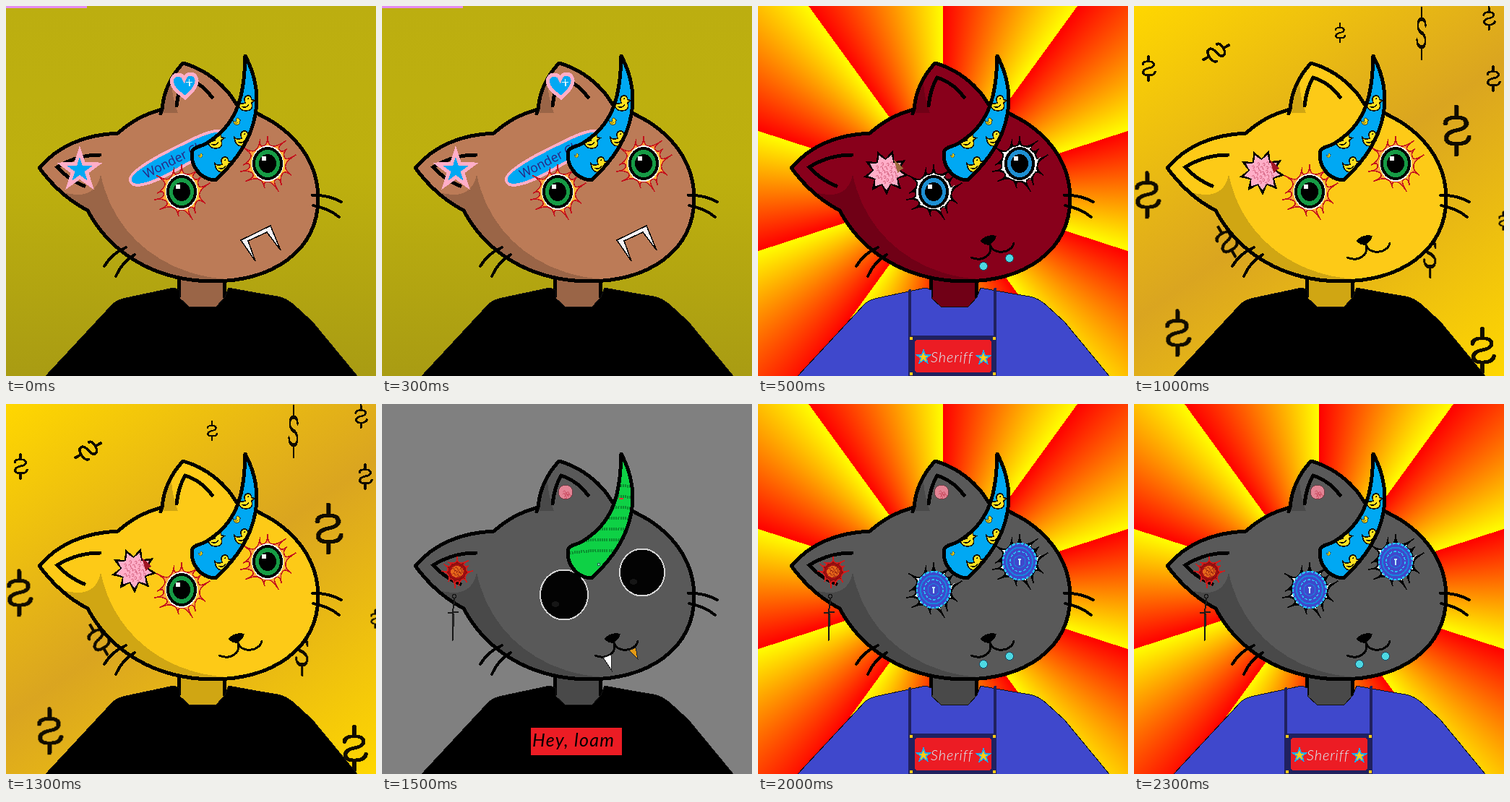
An HTML page that plays this animation: 512x512 px, repeating every 2.5 s.

```html
<!DOCTYPE html>
<html lang="en">
<head>
<meta charset="utf-8">
<title>Horned cat</title>
<style>
  html, body { margin: 0; width: 100%; height: 100%; overflow: hidden; }
  svg { display: block; width: 512px; height: 512px; shape-rendering: crispEdges; }
</style>
</head>
<body>
<svg id="stage" viewBox="0 0 512 512"></svg>
<script>
const stage = document.getElementById('stage');
const BLUE = '#00a8f3', PINK = '#ffaec8', RED = '#ec1c24', GOLD = '#ffca18', ROYAL = '#3f48cc', NAVY = '#20215f';

const path = (d, fill = 'none', stroke = 'none', width = 1, extra = '') =>
  `<path d="${d}" fill="${fill}" stroke="${stroke}" stroke-width="${width}" stroke-linecap="round" ${extra}/>`;
const line = (d, width, color = '#000') => path(d, 'none', color, width);
const oval = (x, y, rx, ry, fill, stroke = 'none', width = 1, extra = '') =>
  `<ellipse cx="${x}" cy="${y}" rx="${rx}" ry="${ry}" fill="${fill}" stroke="${stroke}" stroke-width="${width}" ${extra}/>`;
const rect = (x, y, w, h, fill, extra = '') =>
  `<rect x="${x}" y="${y}" width="${w}" height="${h}" fill="${fill}" ${extra}/>`;
const at = (x, y, art, more = '') => `<g transform="translate(${x} ${y}) ${more}">${art}</g>`;
const range = (n, make) => Array.from({ length: n }, (_, i) => make(i));
const polar = (r, a) => `${(r * Math.sin(a)).toFixed(1)} ${(-r * Math.cos(a)).toFixed(1)}`;

const starPath = (n, outer, inner) =>
  `M${range(2 * n, i => polar(i % 2 ? inner : outer, i * Math.PI / n)).join('L')}Z`;

// Ring of thin, slightly hooked spikes of uneven length.
function burstPath(n, inner, outer) {
  const step = 2 * Math.PI / n;
  return `M${polar(inner, -step / 2)}` + range(n, i => {
    const a = i * step, root = polar(inner, a);
    const tip = polar(outer * (.9 + .1 * Math.sin(i * 2.4)), a + step * .4 * Math.sin(i * 1.7));
    return `Q${root} ${tip}Q${root} ${polar(inner, a + step / 2)}`;
  }).join('') + 'Z';
}

// Short wiggles scattered inside a disc.
const squiggles = (r, n, color) =>
  line(range(n, i => `M${polar(r * Math.sqrt(i / n), i * 2.4)}q2-3 3 0t${2 - i % 5} 2`).join(''), .8, color);

// Backgrounds
const sunburst = 'repeating-conic-gradient(red 0deg, #ff0 36deg)';
const mustard = 'linear-gradient(#bcae10, #beb00e 45%, #a99c13)';
const gold = 'linear-gradient(145deg, #ffd700, #daa520 50%, #ffd700)';

const dollarSign = line('M-12-9Q-12-17 0-17 12-17 11-8 10-2 0 0-11 3-11 10-11 18 0 18 13 18 14 9M0-31V-17M0 18V32', 5, '#110c00');
const dollar = (x, y, size, turn = 0, slim = 1) =>
  at(x, y, dollarSign, `rotate(${turn}) scale(${size * 1.2 * slim} ${size})`);
const money = '<g filter="url(#soft)">' +
  dollar(20, 86, .55) + dollar(114, 64, .65, 60) + dollar(285, 37, .42) + dollar(398, 37, 1.1, 0, -.35) +
  dollar(491, 17, .5) + dollar(497, 100, .55) + dollar(446, 172, 1.05) + dollar(18, 261, .97) +
  dollar(128, 326, .75, -30) + dollar(410, 343, 1, 0, -.5) + dollar(511, 297, .4) +
  dollar(60, 452, .97) + dollar(482, 476, .95) + '</g>';

// Body
const headPath = 'M46 224C72 194 108 178 155 176C172 160 190 150 216 143C218 118 229 96 245 79' +
  'C277 88 304 110 319 136C333 139 343 145 350 150C402 175 432 217 432 267C431 340 368 381 285 381' +
  'C207 380 145 343 113 283C86 269 63 247 46 224Z';
const shadePath = 'M131 233C147 312 212 372 306 378L285 381C207 380 145 343 113 283L80 258Q124 270 131 233Z' +
  'M216 148Q218 125 229 106Q230 128 238 148Z';
const innerEars = 'M130 206Q98 206 71 223Q86 240 108 249M236 138Q239 113 248 99Q270 106 285 126';
const whiskers = 'M424 262Q445 261 464 271M425 276Q446 280 461 292M166 334Q147 342 136 360M178 344Q160 355 152 374';
const neckPath = 'M240 375V404L252 417H292L303 403V375Z';
const shadow = d => path(d, '#000', 'none', 1, 'opacity=".18"');

const cat = skin => path(neckPath, skin) + shadow(neckPath) + line('M239 378V403M302 380V402', 5) +
  path(headPath, skin) + shadow(shadePath) + path(headPath, 'none', '#000', 5, 'stroke-linejoin="round"') +
  line('M216 143L214 149' + innerEars, 5) + line(whiskers, 4);

const shirt = color => path('M55 512L148 412Q155 406 166 404L232 390 240 393V404L253 416H291L303 403 308 390 ' +
  'Q345 397 376 402 388 404 400 415L424 437 486 512Z', color, '#111');

const script = (x, y, size, color, words, more) =>
  `<text x="${x}" y="${y}" fill="${color}" font-family="Lato, sans-serif" font-style="italic" font-size="${size}" ${more}>${words}</text>`;

const badgeStar = path(starPath(5, 10, 4), GOLD, '#1fa8e8', 1.5);
const sheriff = shirt(ROYAL) + line('M210 394V460M328 392V460', 4, NAVY) +
  rect(208, 456, 122, 56, NAVY) + rect(217, 462, 106, 45, RED, 'rx="4"') +
  [212, 327].map(x => oval(x, 460, 2.5, 2.5, GOLD) + oval(x, 509, 2.5, 2.5, GOLD)).join('') +
  at(229, 486, badgeStar) + at(312, 487, badgeStar) +
  script(239, 493, 20, '#d8f8ff', 'Sheriff', 'font-weight="300" letter-spacing=".9"');
const blackShirt = shirt('#000');
const slogan = blackShirt + rect(206, 448, 126, 38, RED) +
  script(208, 474, 25, '#000', 'Hey, loam', 'letter-spacing="1.3"');

// Eyes
const eyes = art => at(243, 257, art) + at(362, 218, art);
const iris = color => oval(0, 0, 19, 21, color, '#000', 4) + oval(0, 0, 12, 13, '#000') + oval(-5, -7, 3.5, 3.5, '#fff');
const lashes = burstPath(13, 25, 42);
const whiteFringe = path(burstPath(13, 24, 31), '#fff');
const flameEye = path(lashes, 'url(#flame)', '#c3101b', 1.5) + oval(0, 0, 22, 25, '#fff') + iris('#169b45');
const blueEye = path(lashes, '#000', '#000', 1.5) + whiteFringe + iris('#1e8fd2');
const mandalaEye = path(lashes, '#000', '#000', 1.5) + whiteFringe + oval(0, 0, 24, 26, ROYAL) +
  range(4, i => oval(0, 0, 23 - 5 * i, 25 - 5.5 * i, 'none', i % 2 ? '#1784dd' : '#25c4f5', 2.5 - i / 2,
    `stroke-dasharray="${i % 2 ? '' : '4 2'}"`)).join('') + line('M0-3V5M-2-3H2', 1.2, '#bdefff');
const darkEye = (x, y, r) => oval(x, y, r, r + 1.5, '#030303', '#d5d5d5', 2) + oval(x - 12, y + 13, 5, 4, '#161616');
const darkEyes = darkEye(252, 264, 33) + darkEye(360, 233, 31);

// Mouths
const smile = path('M308 325Q315 315 330 318 328 327 319 331 311 330 308 325Z', '#000') +
  line('M295 348Q309 354 319 344 323 339 321 330Q326 344 344 339 353 335 354 328', 3);
const stud = (x, y) => oval(x, y, 5.5, 5.5, '#4ed8e2', '#14506a');
const studs = stud(312, 360) + stud(348, 349);
const fangs = path('M306 351L317 347 318 369Z', '#fff', '#222') + path('M342 341L351 337 354 353Z', '#e39a16', '#222');
const longFangs = path('M325 324L366 304 380 338 361 313 335 325 345 353Z', '#f6f3f6', '#000', 1.5);

// Horns
const hornPath = 'M331 69C357 118 356 180 290 241C268 240 254 220 258 200C262 193 270 197 285 185C320 160 330 125 331 69Z';
const horn = (color, pattern) => path(hornPath, color) + `<g clip-path="url(#horn)">${pattern}</g>` +
  path(hornPath, 'none', '#000', 5, 'stroke-linejoin="round"');
const duckArt = path('M-9-2Q-5 2 0-1-3-9 3-10 8-10 8-5L12-4 8-1Q11 8 2 9-8 10-9-2Z', '#ffe11f', '#15130a', 1.5) +
  line('M-4 4Q1 6 4 2', 1.4) + oval(4, -6, 1, 1, '#000');
const duck = (x, y, size) => at(x, y, duckArt, `scale(${size})`);
const duckHorn = horn(BLUE, duck(331, 135, 1.1) + duck(326, 184, 1.1) + duck(289, 187, 1.1) +
  duck(299, 220, 1.1) + duck(319, 160, .5) + duck(269, 207, .3));
const greenHorn = horn('#0ed145', range(7, i =>
  path(`M250 ${118 + i * 15}q50-9 105-3`, 'none', '#0a8f30', 4, 'stroke-dasharray="2 1.2" style="stroke-linecap:butt"')).join('') +
  oval(331, 131, 3, 1.5, '#e33') + oval(300, 222, 2, 2, '#7fa', '#265'));

// Trinkets
const heart = 'M0 18C-12 8-19 1-17-8-14-17-3-16 0-8 3-16 14-17 17-8 19 1 12 8 0 18Z';
const patches =
  path('M172 242C168 230 210 208 232 197C262 182 285 170 300 173V195C262 211 252 218 230 230C205 244 176 255 172 242Z', BLUE, PINK, 4) +
  at(194, 239, '<text font-family="Open Sans, sans-serif" font-size="17.500" fill="#2a2380">Wonder Ch</text>', 'rotate(-27)') +
  at(247, 109, path(heart, BLUE, PINK, 5) + line('M7-7V2M3-3H11', 1.3, '#dff'), 'rotate(-3)') +
  at(102, 227, path(starPath(5, 26, 10), BLUE, PINK, 5));

const brainBurst = corner => at(177, 230, path(starPath(9, 32, 19), '#000') + path(starPath(9, 25, 17), PINK) +
  path('M5-20L21-13 16-4Z', corner) + squiggles(16, 24, '#c8506e'), 'rotate(18)');

const splat = path(burstPath(11, 13, 23), '#8e1010', '#d51a1a', 1.5) +
  oval(0, 0, 10, 9, '#e8681b', '#a80f12', 2) + squiggles(9, 12, '#7c0c0c');
const trinkets = oval(254, 122, 10, 10, '#e38495', '#6e3d45') + at(253, 125, squiggles(5, 7, '#c33d52')) +
  at(104, 232, splat) + oval(100, 266, 2.5, 2.5, 'none', '#111', 1.5) +
  line('M100 269V276M99 277L98 290M92 289L105 288', 2, '#1b1b1b') + path('M97 290H100L98 327H97Z', '#333', '#151515');

const defs = `<defs>
  <radialGradient id="flame"><stop offset=".55" stop-color="#ffd23a"/><stop offset=".75" stop-color="#f9893a"/><stop offset="1" stop-color="#dd3b1e"/></radialGradient>
  <clipPath id="horn"><path d="${hornPath}"/></clipPath>
  <filter id="soft"><feGaussianBlur stdDeviation=".6"/></filter></defs>`;

const scenes = [
  [mustard, rect(0, 0, 112, 3, '#e58df0'), cat('#bc7b57'), blackShirt, patches, eyes(flameEye), longFangs, duckHorn],
  [sunburst, cat('#88001b'), sheriff, brainBurst('#9b6a3c'), eyes(blueEye), smile, studs, duckHorn],
  [gold, money, cat('#fdca17'), blackShirt, brainBurst('#a01525'), eyes(flameEye), smile, duckHorn],
  ['#808080', cat('#595959'), slogan, trinkets, darkEyes, smile, fangs, greenHorn],
  [sunburst, cat('#595959'), sheriff, trinkets, eyes(mandalaEye), smile, studs, duckHorn]
].map(([background, ...layers]) => ({ background, art: defs + layers.join('') }));

let shown = -1;
function draw() {
  const index = Math.floor(performance.now() % 2500 / 500);
  if (index !== shown) {
    shown = index;
    stage.style.background = scenes[index].background;
    stage.innerHTML = scenes[index].art;
  }
  requestAnimationFrame(draw);
}
draw();
</script>
</body>
</html>
```
